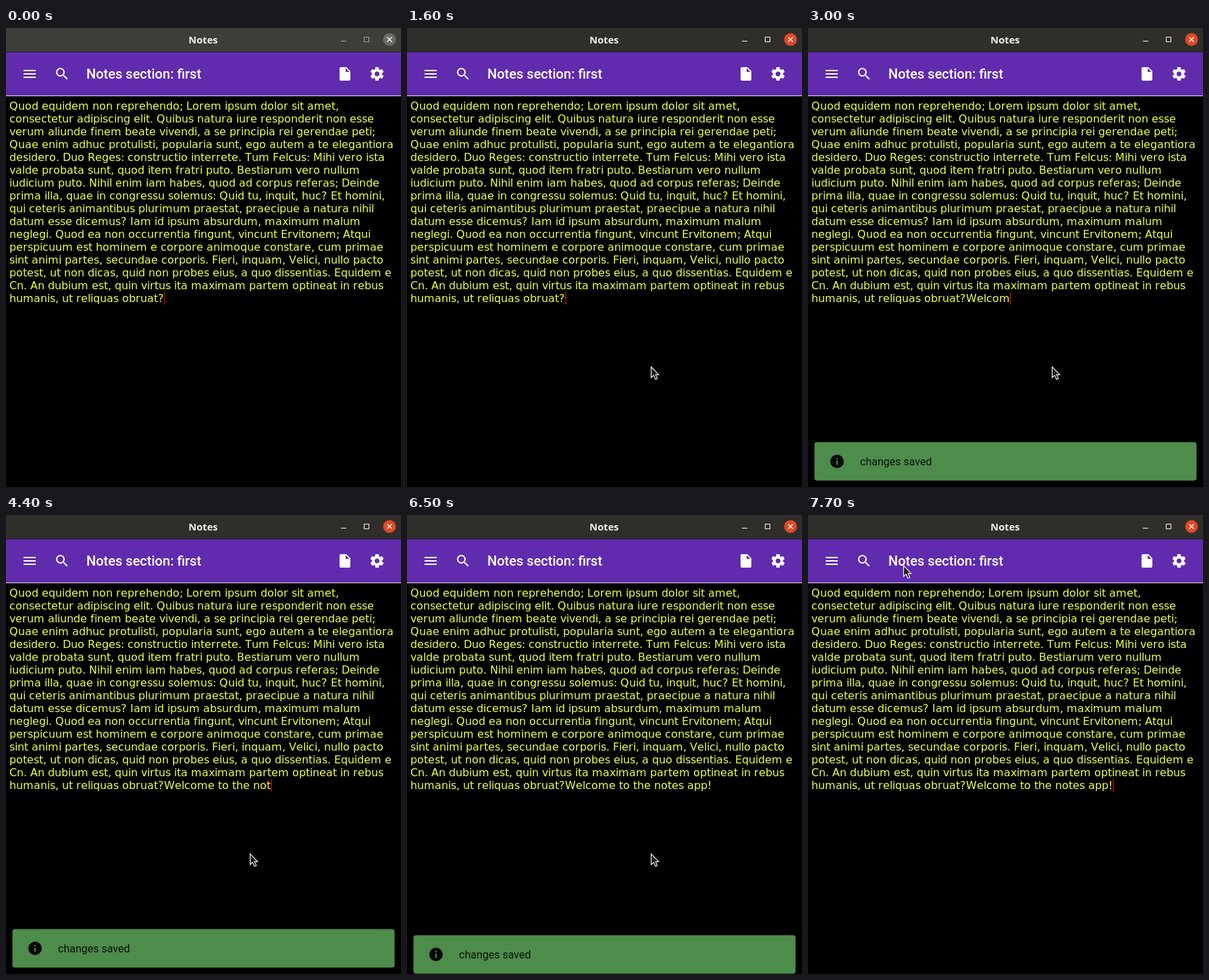
An HTML page that plays this animation: 585x680 px, repeating every 8000 ms.

```html
<!DOCTYPE html>
<html lang="la">
<head>
<meta charset="utf-8">
<title>Notes</title>
<style>
html, body { margin: 0; width: 100%; height: 100%; overflow: hidden; background: #000; }
svg { display: block; width: 585px; height: 680px; }
text { white-space: pre; }
.note { font: 16px "DejaVu Sans", sans-serif; font-variant-ligatures: none; fill: #eeff41; }
.title { font: bold 14.67px "Open Sans", "Noto Sans", sans-serif; text-anchor: middle; fill: #f3f2ef; }
.section { font: 500 20px Roboto, sans-serif; fill: #fff; }
.toast { font: 16px Roboto, sans-serif; fill: #0a120a; }
</style>
</head>
<body>
<svg viewBox="0 0 585 680" xmlns="http://www.w3.org/2000/svg">
  <defs>
    <path id="tooth" d="M9.1 6L9.5 2.4Q9.6 2 10 2H14Q14.4 2 14.5 2.4L14.9 6Z"/>
    <path id="controls" fill="none" d="M496 19.5H504M530.5 13.5H537.5V20.5H530.5Z"/>
  </defs>
  <rect width="585" height="680"/>

  <g>
    <rect width="585" height="36" fill="#3e3d3a"/>
    <use href="#controls" stroke="#aaa9a5"/>
    <circle cx="568" cy="17" r="9.5" fill="#6b6a67"/>
  </g>
  <g id="active">
    <rect width="585" height="36" fill="#2f2e2b"/>
    <use href="#controls" stroke="#fff"/>
    <circle cx="568" cy="17" r="9.5" fill="#df4826"/>
  </g>
  <path fill="none" stroke="#fff" stroke-width="1.4" d="M564.5 13.5L571.5 20.5M571.5 13.5L564.5 20.5"/>
  <rect y="35" width="585" height="1" fill="#20201d"/>
  <text class="title" x="292" y="23">Notes</text>

  <rect y="36" width="585" height="64" fill="#612bad"/>
  <rect y="100" width="585" height="1" fill="#e9e6ee"/>
  <g fill="#fff">
    <path transform="translate(23 56)" d="M3 6H21V8H3ZM3 11H21V13H3ZM3 16H21V18H3Z"/>
    <g transform="translate(71 56)">
      <circle cx="9.5" cy="9.5" r="5.5" fill="none" stroke="#fff" stroke-width="2"/>
      <path d="M14 14H15.5L20.5 19L19 20.5L14 15.5Z"/>
    </g>
    <path transform="translate(490 56)" fill-rule="evenodd"
      d="M6 2H14L20 8V20A2 2 0 0 1 18 22H6A2 2 0 0 1 4 20V4A2 2 0 0 1 6 2ZM13 3.5V9H18.5Z"/>
    <g id="gear" transform="translate(537.5 56)">
      <circle cx="12" cy="12" r="7.5"/>
      <circle cx="12" cy="12" r="3.5" fill="#612bad"/>
    </g>
  </g>
  <text class="section" x="119" y="75">Notes section: first</text>

  <g id="note"></g>
  <rect id="caret" y="391" width="2" height="19" fill="#840a06"/>

  <g id="toast">
    <rect x="9.5" y=".5" width="566" height="57" rx="4" fill="#4e8c4b"/>
    <circle cx="43" cy="29" r="10" fill="#060906"/>
    <path d="M42 24h2v2h-2zM42 28h2v6h-2z" fill="#4e8c4b"/>
    <text class="toast" x="77" y="35">changes saved</text>
  </g>

  <path id="pointer" d="M.6 1.2V17L4.3 13.6L7 19.6L9.8 18.4L7.2 12.6H11.8Z"
    fill="#1c1c1c" stroke="#fff" stroke-width="1.1"/>
</svg>
<script>
const LOOP = 8000, STEP = 100, LEFT = 5, LINE = 19;
const TYPE_START = 2400, TYPE_END = 5700;
const $ = id => document.getElementById(id);

const lines = `Quod equidem non reprehendo; Lorem ipsum dolor sit amet,
consectetur adipiscing elit. Quibus natura iure responderit non esse
verum aliunde finem beate vivendi, a se principia rei gerendae peti;
Quae enim adhuc protulisti, popularia sunt, ego autem a te elegantiora
desidero. Duo Reges: constructio interrete. Tum Felcus: Mihi vero ista
valde probata sunt, quod item fratri puto. Bestiarum vero nullum
iudicium puto. Nihil enim iam habes, quod ad corpus referas; Deinde
prima illa, quae in congressu solemus: Quid tu, inquit, huc? Et homini,
qui ceteris animantibus plurimum praestat, praecipue a natura nihil
datum esse dicemus? Iam id ipsum absurdum, maximum malum
neglegi. Quod ea non occurrentia fingunt, vincunt Ervitonem; Atqui
perspicuum est hominem e corpore animoque constare, cum primae
sint animi partes, secundae corporis. Fieri, inquam, Velici, nullo pacto
potest, ut non dicas, quid non probes eius, a quo dissentias. Equidem e
Cn. An dubium est, quin virtus ita maximam partem optineat in rebus
humanis, ut reliquas obruat?`.split("\n");
const base = lines[lines.length - 1];
const added = "Welcome to the notes app!";

const mix = (a, b, p) => a + (b - a) * p;
const ramp = (t, from, to) => Math.min(1, Math.max(0, (t - from) / (to - from)));
const smooth = (t, from, to) => { const p = ramp(t, from, to); return p * p * (3 - 2 * p); };
const easeOut = (t, from, to) => 1 - (1 - ramp(t, from, to)) ** 2;

const pen = document.createElement("canvas").getContext("2d");
pen.font = '16px "DejaVu Sans", sans-serif';

// Whole-pixel advances, as in hinted text
function stops(str) {
  let x = LEFT;
  return [x, ...Array.from(str, c => x += Math.floor(pen.measureText(c).width + .51))];
}

function svg(tag, attrs, parent) {
  const el = document.createElementNS("http://www.w3.org/2000/svg", tag);
  for (const k in attrs) el.setAttribute(k, attrs[k]);
  return parent.appendChild(el);
}

const rows = lines.map((str, i) => {
  const el = svg("text", { class: "note", y: 121 + i * LINE, x: stops(str).join(" ") }, $("note"));
  el.textContent = str;
  return el;
});
const lastRow = rows[rows.length - 1];
const ends = stops(base + added);
lastRow.setAttribute("x", ends.join(" "));

for (let a = 0; a < 360; a += 60) {
  $("gear").prepend(svg("use", { href: "#tooth", transform: `rotate(${a} 12 12)` }, $("gear")));
}

// A quick first word, then a steady pace that slows down
function typed(t) {
  if (t < TYPE_START) return 0;
  if (t < 2800) return 2;
  const n = 4 + 10 * ramp(t, 2800, 3800) + 8 * ramp(t, 3800, 5000)
    + 2 * ramp(t, 5000, 5400) + ramp(t, 5400, TYPE_END);
  return Math.floor(n + 1e-6);
}

// Blinks twice as long as half a second; stays on while typing
function caretOn(t) {
  const since = t < TYPE_START ? t + 400 : Math.max(0, t - TYPE_END);
  return since % 1000 < 500;
}

// Comes in from the lower right, later overshoots the heading and settles on it
function pointerAt(t) {
  const enter = easeOut(t, 450, 900), leave = smooth(t, 7000, 7500), settle = smooth(t, 7500, 7700);
  const along = (a, b, c, d) => mix(mix(mix(a, b, enter), c, leave), d, settle);
  return [along(480, 361, 107, 141), along(563, 501, 27, 74)];
}

function show(el, on) {
  el.setAttribute("visibility", on ? "visible" : "hidden");
}

function draw(t) {
  const n = typed(t);
  lastRow.textContent = base + added.slice(0, n);
  $("caret").setAttribute("x", ends[base.length + n]);
  show($("caret"), caretOn(t));

  $("active").setAttribute("opacity", ramp(t, 400, 700));
  const rise = smooth(t, 2760, 3000) - smooth(t, 6440, 6700);
  $("toast").setAttribute("transform", `translate(0 ${Math.round(mix(680, 613, rise))})`);

  $("pointer").setAttribute("transform", `translate(${pointerAt(t).map(Math.round)})`);
  show($("pointer"), t >= 500);
}

let start, shown = -1;
function frame(now) {
  start ??= now;
  const t = Math.floor(((now - start) % LOOP) / STEP) * STEP;
  if (t !== shown) draw(shown = t);
  requestAnimationFrame(frame);
}
draw(0);
requestAnimationFrame(frame);
</script>
</body>
</html>
```
